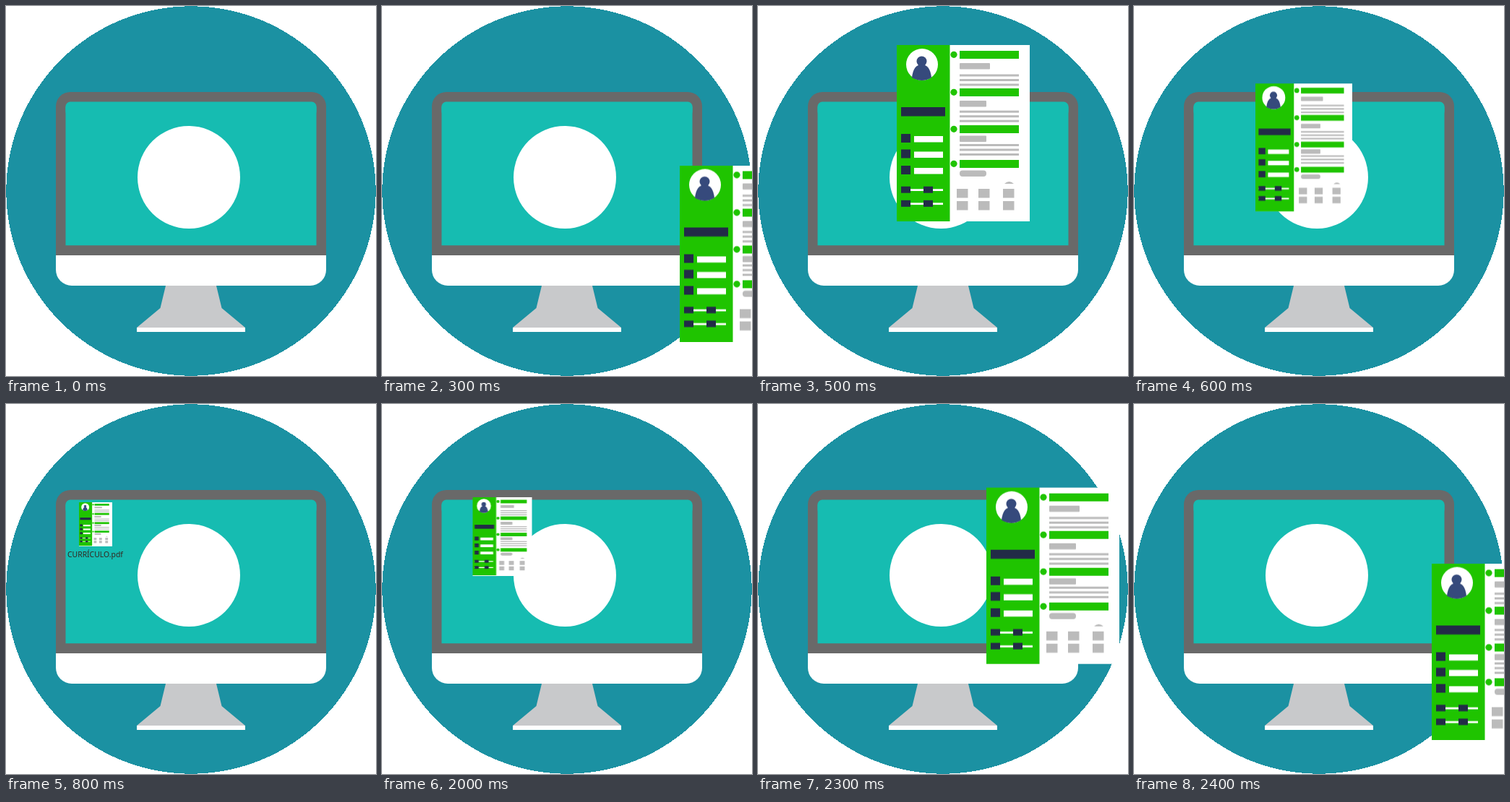
Recreate the animation shown at these times as an HTML page. Size 512 by 512 pixels, loop 2.5 s.

```html
<!DOCTYPE html>
<html lang="pt">
<head>
<meta charset="utf-8">
<title>Currículo</title>
<style>
  html, body { margin: 0; width: 100%; height: 100%; overflow: hidden; background: #fff; }
  svg { display: block; width: 100%; height: 100%; }
  #doc { transform-origin: 0 0; transform-box: view-box; opacity: 0; }
  #label { font: 10.4px "Noto Sans", "Open Sans", sans-serif; fill: #35261f; opacity: 0; }
</style>
</head>
<body>
<svg viewBox="0 0 512 512">
  <circle cx="256" cy="256" r="255.700" fill="#1b91a2" shape-rendering="crispEdges"/>

  <!-- Monitor -->
  <path d="M69 346V139a20 20 0 0 1 20-20H423a20 20 0 0 1 20 20V346z" fill="#696969"/>
  <rect x="82.500" y="132.500" width="347" height="20" rx="6.500" fill="#16bcb1"/>
  <path d="M82.500 139H429.500V331.200H82.500z" fill="#16bcb1"/>
  <path d="M69 345H443V365a22 22 0 0 1-22 22H91a22 22 0 0 1-22-22z" fill="#fff"/>
  <path d="M221 387H291L298.500 418L331 445H181L213.500 418z" fill="#c8c9cb"/>
  <path d="M181 445H331V451H181z" fill="#fff"/>
  <circle cx="253" cy="237" r="71" fill="#fff"/>

  <text id="label" x="85" y="212">CURRÍCULO.pdf</text>
  <g id="doc"></g>
</svg>
<script>
const GREEN = '#1fc400', NAVY = '#222b47', BLUE = '#364a7c', GREY = '#bbb', WHITE = '#fff';
const LOOP = 2500;
const doc = document.getElementById('doc');
const label = document.getElementById('label');

function add(tag, attrs) {
  const el = document.createElementNS('http://www.w3.org/2000/svg', tag);
  for (const key in attrs) el.setAttribute(key, attrs[key]);
  doc.append(el);
}
const rect = (x, y, width, height, fill, rx = 0) => add('rect', { x, y, width, height, fill, rx });
const disc = (cx, cy, r, fill) => add('circle', { cx, cy, r, fill });

function drawSidebar() {
  rect(0, 0, 73.5, 244, GREEN);
  disc(35, 27, 22, WHITE);
  disc(34.5, 22.5, 7, BLUE);
  add('path', { d: 'M21 45Q23 27 34.500 27Q46 27 48 45Q35 53 21 45z', fill: BLUE });
  rect(6, 86, 61, 12.5, NAVY);
  for (const y of [123, 144.5, 167]) {
    rect(6, y, 13, 12, NAVY);
    rect(24, y + 3, 40, 8.5, WHITE);
  }
  for (const y of [195.7, 214.8]) {
    rect(6, y + 3.5, 58, 2.8, WHITE);
    rect(6, y, 13, 9, NAVY);
    rect(37, y, 13, 9, NAVY);
  }
}

function drawSections() {
  [8, 60, 111, 159].forEach((y, i) => {
    disc(79, y + 5.3, 4.6, GREEN);
    rect(87, y, 82, 11, GREEN);
    rect(87, y + (i < 2 ? 17 : 14.5), i ? 37 : 42, 8.5, GREY, i === 3 ? 4 : 1);
  });
  for (const top of [40.5, 90.7, 137])
    for (let i = 0; i < 3; i++) rect(87, top + i * 6.5, 82, 3, GREY);
  for (const y of [199, 216])
    for (const x of [83, 113, 147]) rect(x, y, 15.5, 12.5, GREY);
  add('path', { d: 'M149 192Q155.500 186 162 192z', fill: GREY });
}

rect(0, 0, 184, 244, WHITE);
drawSidebar();
drawSections();

// Flight into the desktop: x, y, scale
const path = [
  [412, 220.5, 1], [316, 115.7, 1], [192, 54, 1],
  [168, 107.3, 0.725], [125.5, 129, 0.443], [101, 136, 0.247]
];
const pose = (time, [x, y, s], opacity = 1) => ({
  offset: time / LOOP, opacity, transform: `translate(${x}px, ${y}px) scale(${s})`
});
const flyIn = path.map((p, i) => pose(300 + i * 100, p));
const flyOut = path.slice(0, 5).reverse().map((p, i) => pose(2000 + i * 100, p));

const hold = frames => frames.map(f => ({ ...f, easing: 'step-end' }));
const timing = { duration: LOOP, iterations: Infinity };
doc.animate(hold([pose(0, path[0], 0), ...flyIn, ...flyOut, pose(LOOP, path[0], 0)]), timing);
label.animate(hold([
  { offset: 0, opacity: 0 },
  { offset: 800 / LOOP, opacity: 1 },
  { offset: 2000 / LOOP, opacity: 0 },
  { offset: 1, opacity: 0 }
]), timing);
</script>
</body>
</html>
```
